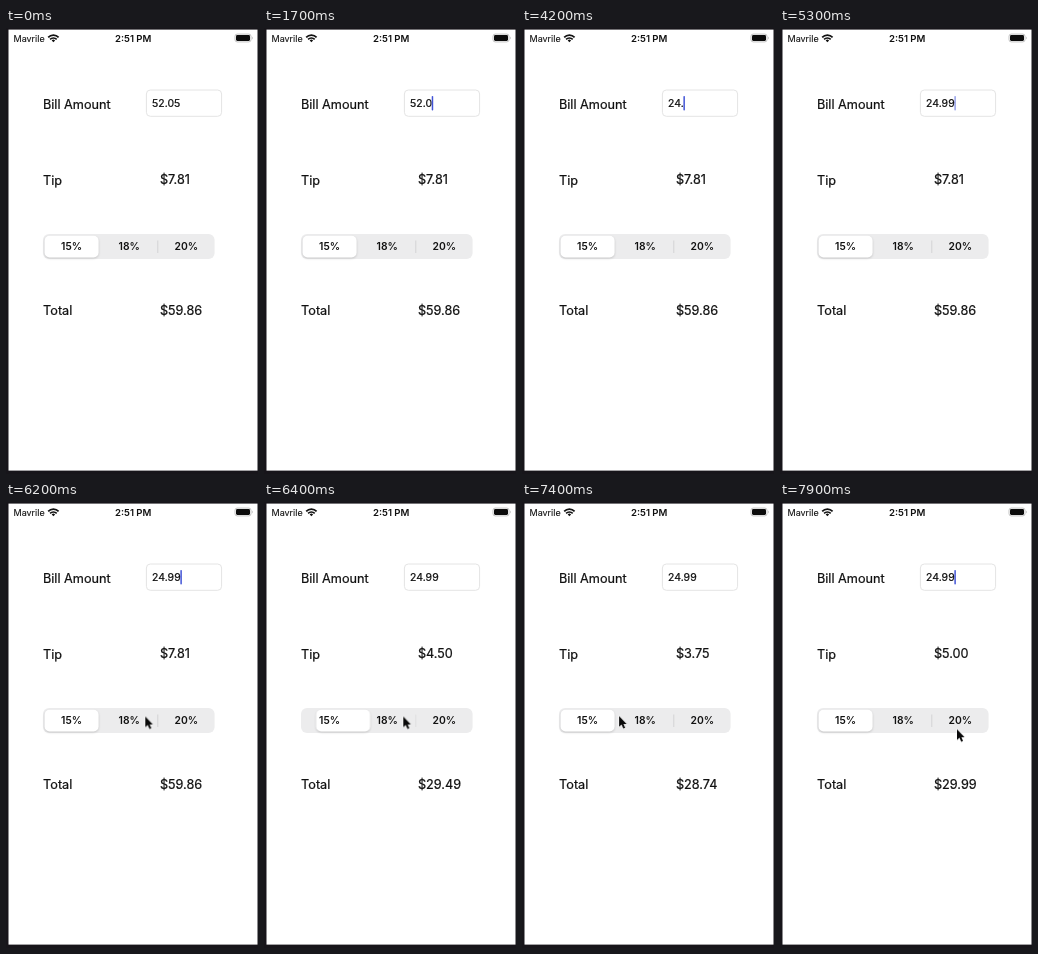
An HTML page for the animation above (8000 ms loop, 252 by 446 pixels).

```html
<!DOCTYPE html>
<html lang="en">
<head>
<meta charset="utf-8">
<title>Tip calculator</title>
<style>
  html, body { margin: 0; width: 100%; height: 100%; overflow: hidden; background: #17151a; }
  svg { display: block; width: 100vw; height: 100vh; }
  text { font: 400 12.7px Inter, "Open Sans", sans-serif; fill: #111; stroke: #111; stroke-width: .22px; }
  .status { font-size: 9px; stroke-width: .1px; }
  .time { font-size: 9.6px; font-weight: 600; text-anchor: middle; stroke: none; }
  .seg { font-size: 10.3px; font-weight: 600; text-anchor: middle; stroke: none; }
  #bill { font-size: 10.5px; }

  #caret, #thumb, #divider, #pointer { animation: 8s linear infinite; }
  #caret { fill: #4254d6; animation-name: blink; }
  #thumb { filter: drop-shadow(0 1px 1.2px rgba(0, 0, 0, .17)); animation-name: slide; }
  #divider { animation-name: divide; }
  #pointer { animation-name: move; }

  @keyframes blink {
    0%, 3.5% { opacity: 0; }
    5%, 11% { opacity: 1; }
    12.5%, 16% { opacity: 0; }
    18.5%, 65.5% { opacity: 1; }
    67.25%, 71% { opacity: 0; }
    72.5%, 78% { opacity: 1; }
    79.75%, 83.5% { opacity: 0; }
    85%, 90.5% { opacity: 1; }
    92.25%, 96% { opacity: 0; }
    97.5%, 100% { opacity: 1; }
  }
  @keyframes slide {
    0%, 78.75% { transform: none; animation-timing-function: ease-in-out; }
    82.5%, 87.5% { transform: translateX(57.3px); animation-timing-function: ease-in-out; }
    91.25%, 100% { transform: none; }
  }
  @keyframes divide {
    0%, 78.75% { opacity: 1; }
    81.25%, 88.75% { opacity: 0; }
    91.25%, 100% { opacity: 1; }
  }
  @keyframes move {
    0%, 67.3% { opacity: 0; transform: translate(88px, 17px); }
    67.4% { opacity: 1; transform: translate(88px, 17px); animation-timing-function: ease-in-out; }
    77%, 81.5% { opacity: 1; transform: translate(139.3px, 214.5px); animation-timing-function: ease-in-out; }
    86%, 90% { opacity: 1; transform: translate(72.7px, 210px); animation-timing-function: ease-in-out; }
    97.5%, 100% { opacity: 1; transform: translate(177px, 227.2px); }
  }
</style>
</head>
<body>
<svg viewBox="0 0 252 446" preserveAspectRatio="none">
  <rect width="252" height="446" fill="#17151a"/>
  <rect x="2.5" y="1.6" width="249" height="441" fill="#fff"/>

  <!-- status bar -->
  <text class="status" x="7.5" y="13.5">Mavrile</text>
  <g fill="none" stroke="#111" stroke-width="1.7">
    <path d="M42.2 9.3a7.1 7.1 0 0 1 10.4 0"/>
    <path d="M44.1 11.4a4.6 4.6 0 0 1 6.6 0"/>
  </g>
  <path d="M47.4 14.2l-1.7-1.8a2.5 2.5 0 0 1 3.4 0z" fill="#111"/>
  <text class="time" x="127.2" y="13.6">2:51 PM</text>
  <rect x="229" y="6.1" width="16" height="7.8" rx="2.2" fill="none" stroke="#b4b4b4" stroke-width=".8"/>
  <rect x="230" y="7.1" width="14" height="5.8" rx="1.3" fill="#0c0c0c"/>
  <path d="M246 8.5q1.3 1.5 0 3z" fill="#999"/>

  <!-- form -->
  <text x="37" y="80.7">Bill Amount</text>
  <rect x="140.4" y="62" width="75.2" height="26.3" rx="4" fill="#fff" stroke="#e4e4e4" stroke-width="1"/>
  <text id="bill" x="146" y="79.3">52.05</text>
  <rect id="caret" x="174.3" y="68" width="1.5" height="14.4" rx=".7"/>

  <text x="37.1" y="157.4">Tip</text>
  <text id="tip" x="153.9" y="156.4">$7.81</text>

  <rect x="37" y="206" width="171.6" height="25" rx="6" fill="#ececed"/>
  <rect id="divider" x="151.3" y="212.5" width="1" height="12.5" fill="#d3d3d5"/>
  <rect id="thumb" x="38.6" y="207.8" width="54" height="21.6" rx="5" fill="#fff"/>
  <text class="seg" x="65.6" y="222.4">15%</text>
  <text class="seg" x="123.2" y="222.4">18%</text>
  <text class="seg" x="180.4" y="222.4">20%</text>

  <text x="37.1" y="286.7">Total</text>
  <text id="total" x="153.9" y="286.6">$59.86</text>

  <path id="pointer" d="M0 0V10.8L2.5 8.6L4.2 12.6L6.1 11.8L4.4 7.9H7.6Z"
        fill="#0a0a0a" stroke="#fff" stroke-width="1" stroke-linejoin="round" paint-order="stroke"/>
</svg>
<script>
  const LOOP = 8000;
  const typed = [
    [0, "52.05"], [1690, "52.0"], [1990, "52."], [2190, "52"], [2490, "5"], [2990, ""],
    [3390, "2"], [3790, "24"], [4190, "24."], [4690, "24.9"], [4790, "24.99"]
  ];
  // [time, bill, rate]: totals refresh only when a segment is tapped
  const taps = [[0, 52.05, .15], [6290, 24.99, .18], [6990, 24.99, .15], [7880, 24.99, .2]];

  const [bill, caret, tip, total] =
    ["bill", "caret", "tip", "total"].map(id => document.getElementById(id));
  const latest = (list, t) => list.filter(row => row[0] <= t).pop();
  const money = v => "$" + v.toFixed(2);
  const put = (el, s) => { if (el.textContent !== s) el.textContent = s; };

  function draw(t) {
    const text = latest(typed, t)[1];
    const [, amount, rate] = latest(taps, t);
    put(bill, text);
    put(tip, money(amount * rate));
    put(total, money(amount * (1 + rate)));
    caret.setAttribute("x", 145.7 + (text ? bill.getComputedTextLength() : 0));
  }

  let start;
  function tick(now) {
    start ??= now;
    draw(Math.max(0, now - start) % LOOP);
    requestAnimationFrame(tick);
  }
  draw(0);
  requestAnimationFrame(tick);
</script>
</body>
</html>
```
